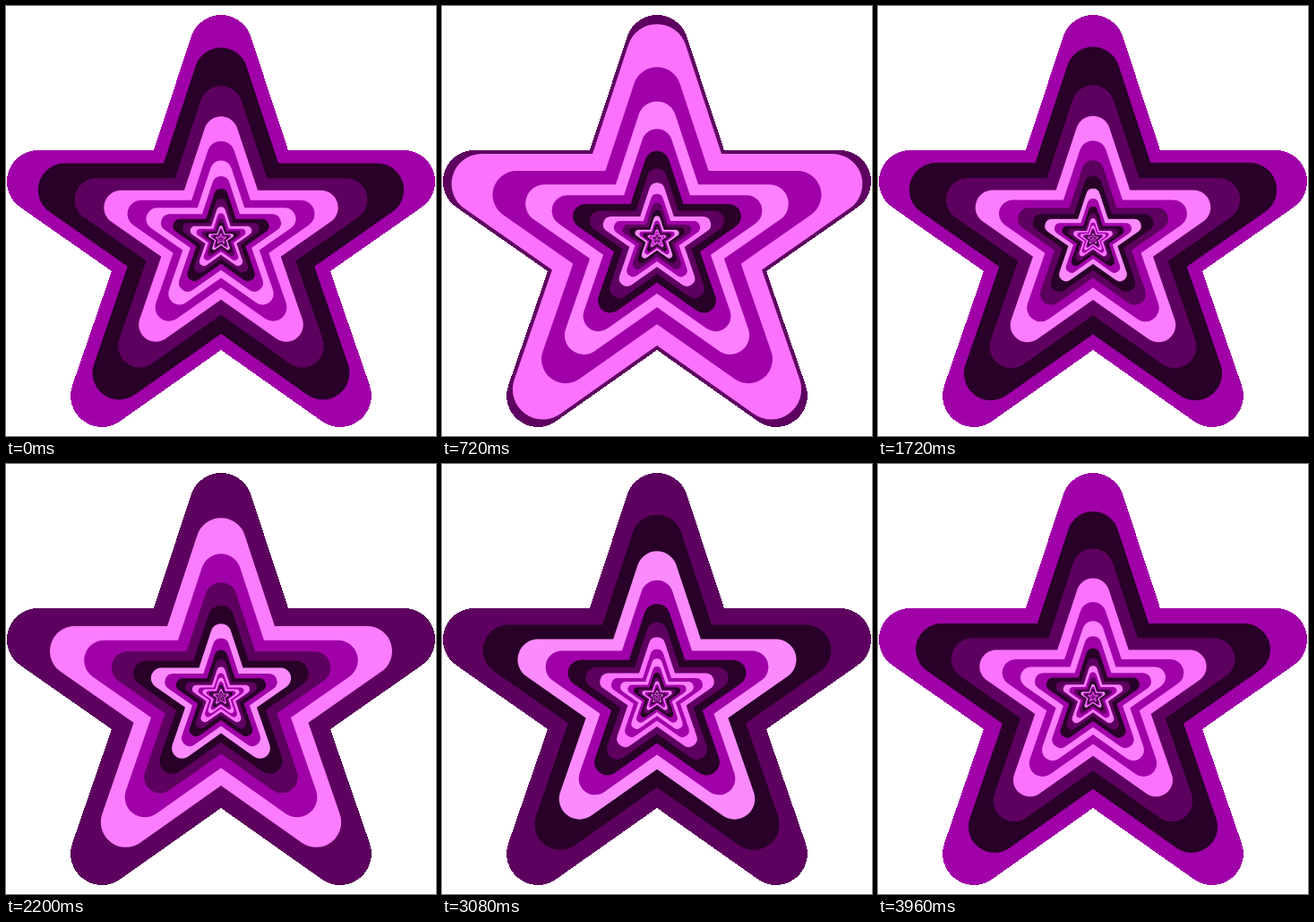
Write an HTML page that moves like this. It is 480 by 480 pixels and loops after 4000 ms.

```html
<!DOCTYPE html>
<html lang="en">
<head>
<meta charset="utf-8">
<title>Endless star</title>
<style>
  html, body { margin: 0; width: 100%; height: 100%; overflow: hidden; background: #fff; }
  svg { display: block; width: 100%; height: 100%; }
</style>
</head>
<body>
<svg id="stage" viewBox="0 0 480 480">
  <defs>
    <path id="star" d="M165 161 L206.8 34 A35 35 0 0 1 273.2 34 L315 161
      L444 161 A35 35 0 0 1 464 224.7 L362 296
      L406 423.6 A35 35 0 0 1 352.8 463.6 L240 384
      L127.2 463.6 A35 35 0 0 1 74 423.6 L118 296
      L16 224.7 A35 35 0 0 1 36 161 Z"/>
  </defs>
</svg>
<script>
  const LOOP = 4000, STEP = 40, RINGS = 26;
  const RATIO = 1.25, BASE = 0.8545;
  const CX = 240, CY = 260;

  const dark = '#280028', plum = '#5e0060', violet = '#a000a8';
  const pinks = ['#fc72ff', '#fc80ff', '#fc7cff', '#fc8aff'];
  const colors = [
    dark, plum, pinks[0], violet, pinks[1], violet,
    dark, plum, pinks[2], violet,
    plum, dark, pinks[3], violet
  ];

  const stage = document.getElementById('stage');
  const rings = Array.from({ length: RINGS }, (_, i) => {
    const ring = document.createElementNS('http://www.w3.org/2000/svg', 'use');
    ring.setAttribute('href', '#star');
    if (i === 0) ring.setAttribute('shape-rendering', 'crispEdges');
    return stage.appendChild(ring);
  });

  function draw(time) {
    const t = Math.floor((time % LOOP) / STEP) * STEP;
    const shift = t / LOOP * colors.length;
    // The outermost ring has already outgrown the star and is held at full size.
    const first = Math.ceil(shift + Math.log(BASE) / Math.log(RATIO)) - 1;
    rings.forEach((ring, i) => {
      const index = first + i;
      const scale = Math.min(1, BASE * RATIO ** (shift - index));
      ring.setAttribute('transform', `translate(${CX} ${CY}) scale(${scale}) translate(${-CX} ${-CY})`);
      ring.setAttribute('fill', colors[(index + colors.length) % colors.length]);
    });
  }

  function tick(now) {
    draw(now);
    requestAnimationFrame(tick);
  }

  draw(0);
  requestAnimationFrame(tick);
</script>
</body>
</html>
```
